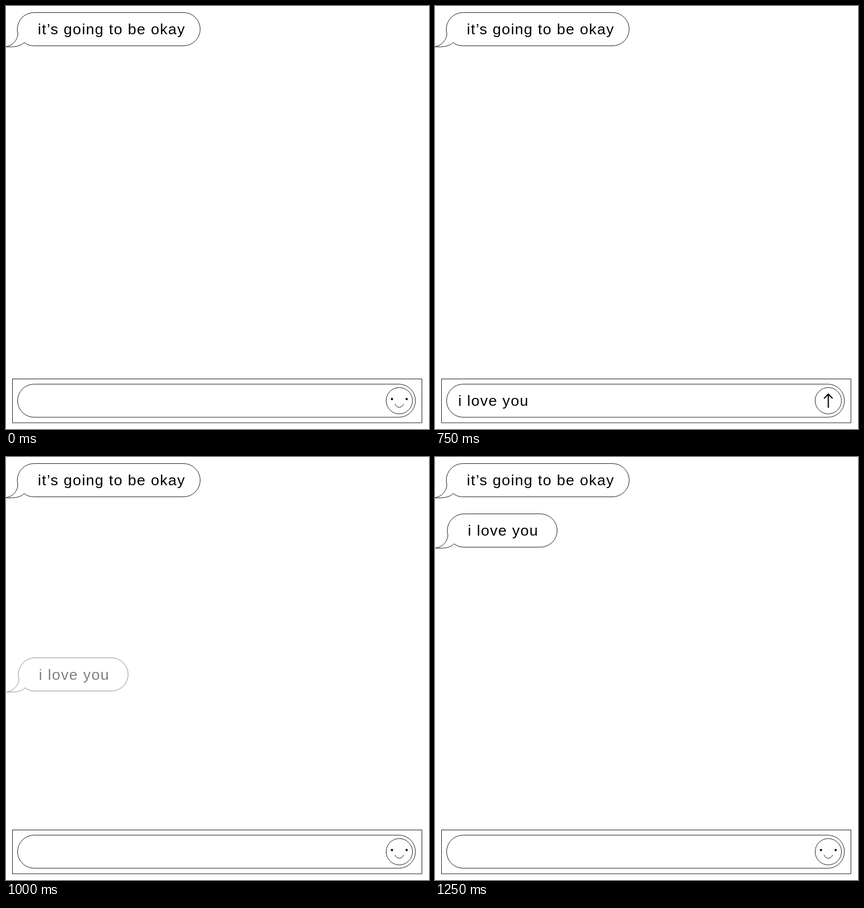
An HTML page that plays this animation: 748 by 748 pixels, repeating every 1650 ms.

```html
<!DOCTYPE html>
<html lang="en">
<head>
<meta charset="utf-8">
<style>
  html, body { margin: 0; width: 100%; height: 100%; overflow: hidden; background: #fff; }
  svg { display: block; width: 100vw; height: 100vh; }
  text { font: 26.5px "Liberation Sans", Arial, sans-serif; letter-spacing: 1.3px; white-space: pre; fill: #000; }
  .line { fill: none; stroke: #222; stroke-width: 1; }
  .bold .line { stroke: #000; stroke-width: 1.3; }
  #arrow { fill: none; stroke: #000; stroke-width: 2.1; }
  .pressed #button { fill: #000; }
  .pressed #arrow { stroke: #fff; stroke-width: 1.8; }
</style>
</head>
<body>
<svg viewBox="0 0 748 748">
  <g id="first"></g>
  <g id="reply"></g>
  <g id="bar">
    <rect class="line" x="11.5" y="659.5" width="724" height="77.5"/>
    <rect class="line" x="20.5" y="668.7" width="703.5" height="58.5" rx="29.25"/>
    <text id="typed" x="41" y="707"></text>
    <circle class="line" id="button" cx="695.5" cy="698" r="23.3"/>
    <g id="face">
      <circle cx="682.5" cy="695" r="2"/>
      <circle cx="708.5" cy="695" r="2"/>
      <path class="line" d="M688 703.5C690 711.5 701 711.5 703 703.5"/>
    </g>
    <path id="arrow" d="M695.5 710.5V686.5M688 694L695.5 686.3L703 694"/>
  </g>
</svg>
<script>
const LOOP = 1650, STEP = 50, TYPE = 350, SEND = 800, RELEASE = 900, LAND = 1250;
const MESSAGE = "i love you";
const $ = id => document.getElementById(id);

// Speech bubble whose straight top edge ends at x = right
function bubble(id, text, right) {
  $(id).innerHTML = `<path class="line" d="M-1 72C12 71 21 59 21 49C20.4 46 20 44 20 41
    A29.5 29.4 0 0 1 49.5 11.6H${right}a29.4 29.4 0 0 1 0 58.8H49.5C42 70.4 36 68 32 64.5
    C26 71.5 14 73 -1 72"/><text x="56.3" y="50">${text}</text>`;
}

function draw(now) {
  const t = Math.floor(now % LOOP / STEP) * STEP;
  const typing = t >= TYPE && t < SEND;
  const pressed = t >= SEND && t < RELEASE;
  const count = (t - TYPE) / STEP + 1;
  // The second space comes together with the letter after it
  $("typed").textContent = typing ? MESSAGE.slice(0, count > 6 ? count + 1 : count) : "";
  $("bar").setAttribute("class", (pressed ? "pressed" : "") + (t === SEND ? " bold" : ""));
  $("face").style.display = typing || pressed ? "none" : "";
  $("arrow").style.display = typing || pressed ? "" : "none";

  const left = Math.max(0, LAND - t);
  $("reply").style.display = t < SEND ? "none" : "";
  $("reply").setAttribute("opacity", 1 - left / 500);
  $("reply").setAttribute("transform", `translate(1.8 ${89 + left * 1.018})`);
  requestAnimationFrame(() => draw(performance.now() - start));
}

bubble("first", "it’s going to be okay", 314);
bubble("reply", MESSAGE, 184.8);
const start = performance.now();
draw(0);
</script>
</body>
</html>
```
